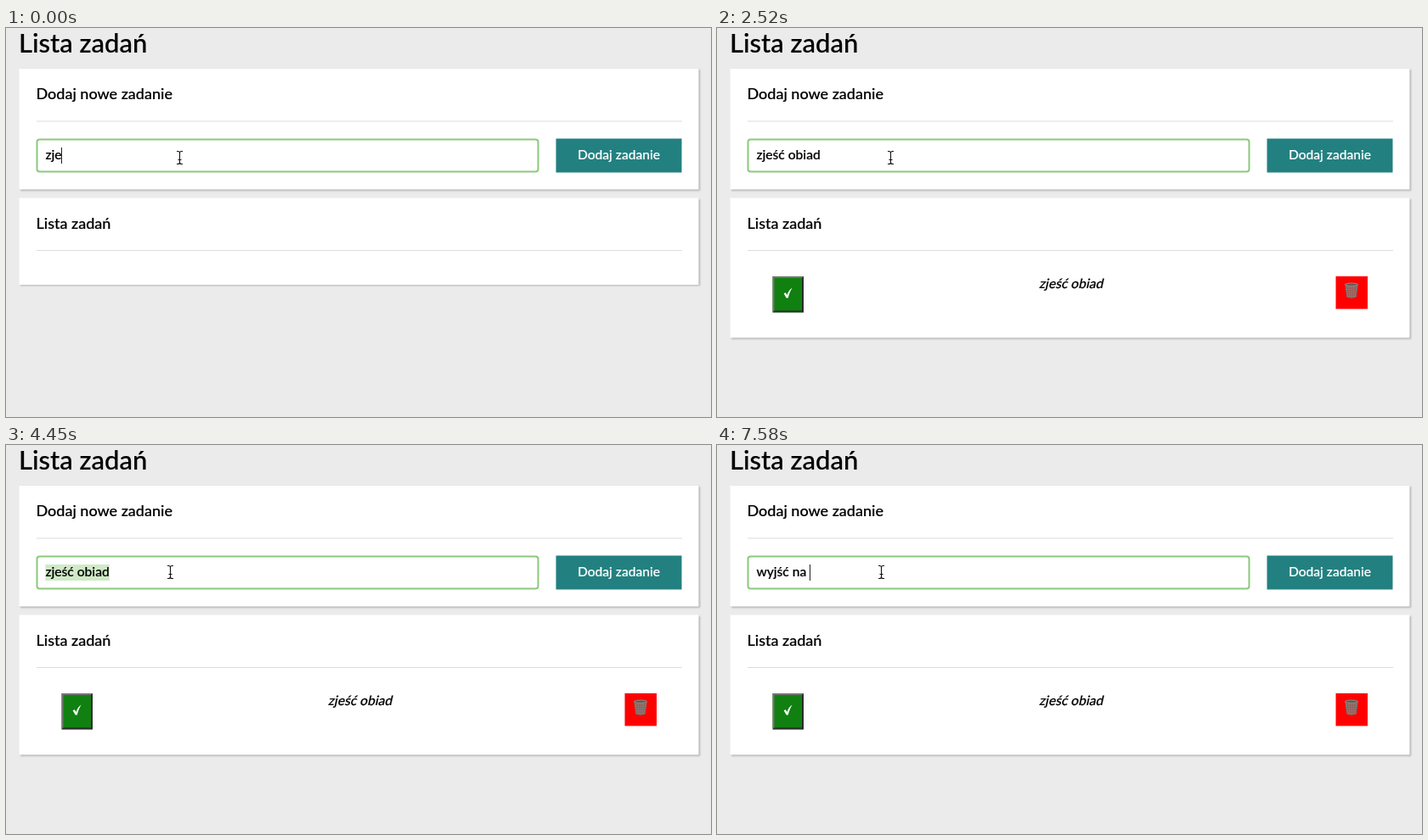
Animation of 830x459 px, one loop 8 s. Source, as an HTML page with a canvas:

```html
<!DOCTYPE html>
<html lang="pl">
<head>
<meta charset="utf-8">
<title>Lista zadań</title>
<style>
html, body { margin: 0; width: 830px; height: 459px; overflow: hidden; background: #ebebeb; }
canvas { display: block; }
</style>
</head>
<body>
<canvas id="stage" width="830" height="459"></canvas>
<script>
const ctx = document.getElementById('stage').getContext('2d');
const LOOP = 8000;
const TASK = 'zjeść obiad';
const INPUT_X = 46.4;

// Each entry holds from its time until the next one.
const typing = [
  [0, 'zje'], [290, 'zjeś'], [590, 'zjeść'], [890, 'zjeść '], [1030, 'zjeść o'],
  [1330, 'zjeść ob'], [1620, 'zjeść obi'], [1770, 'zjeść obia'], [2070, TASK],
  [5790, 'w'], [5940, 'wy'], [6240, 'wyj'], [6530, 'wyjś'], [6830, 'wyjść'],
  [7130, 'wyjść n'], [7280, 'wyjść na'], [7580, 'wyjść na ']
];
const caret = [[0, true], [2520, false], [3120, true], [3560, false], [4000, true], [4300, false], [5790, true]];
const selection = [[0, null], [4300, 6], [4450, 0], [5790, null]];
const pointer = [[0, [204.5, 153]], [3560, [203.5, 147]], [3710, [199.5, 148]], [3860, [193.5, 150]]];

const at = (steps, t) => steps.findLast(([start]) => t >= start)[1];
const setFont = size => { ctx.font = `500 ${size}px Lato, sans-serif`; };

function box(x, y, w, h, color) {
  ctx.fillStyle = color;
  ctx.fillRect(x, y, w, h);
}

function text(str, x, y, size, color = '#000', align = 'left') {
  setFont(size);
  ctx.textAlign = align;
  ctx.fillStyle = ctx.strokeStyle = color;
  ctx.lineWidth = 0.2;
  ctx.fillText(str, x, y);
  ctx.strokeText(str, x, y);
}

function widthOf(str) {
  setFont(15.6);
  return ctx.measureText(str).width;
}

function stroke(path, color, width) {
  ctx.strokeStyle = color;
  ctx.lineWidth = width;
  ctx.stroke(new Path2D(path));
}

function fill(path, color) {
  ctx.fillStyle = color;
  ctx.fill(new Path2D(path));
}

function card(y, h, heading) {
  ctx.save();
  ctx.shadowColor = 'rgba(0,0,0,.25)';
  ctx.shadowBlur = 2;
  ctx.shadowOffsetX = ctx.shadowOffsetY = 1;
  box(15.5, y, 800, h, '#fff');
  ctx.restore();
  text(heading, 35.5, y + 36, 18);
  box(36, y + 61.5, 760, 1, '#dcdcdc');
}

function doneButton() {
  box(65.5, 293, 36.5, 42.5, '#108010');
  fill('M65.5 335.5V293H102L100 295H67.5V333.5Z', '#757575');
  fill('M102 293V335.5H65.5L67.5 333.5H100V295Z', '#2b2b2b');
  fill('M78.6 313.2L80.8 312.2L82.6 315C83.6 311.8 85.4 308.8 88.6 306.6C86.4 310.4 84.8 314.2 83.8 318.6H81.6Z', '#fff');
}

function deleteButton() {
  box(728.5, 293, 37.5, 38.5, '#f00');
  fill('M739.8 303L741.8 317.3Q747 319.4 752.2 317.3L754.2 303Z', '#a5504c');
  for (let i = 0; i < 5; i++) {
    const x = 741 + i * 3;
    stroke(`M${x} 304L${747 + (x - 747) * 0.72} 318`, '#7d817b', 0.8);
    stroke(`M${740.2 + i * 0.4} ${306 + i * 2.6}H${753.8 - i * 0.4}`, '#858a84', 0.7);
  }
  stroke('M739.8 303L741.8 317.3Q747 319.4 752.2 317.3L754.2 303', '#77736f', 1);
  ctx.beginPath();
  ctx.ellipse(747, 302.7, 7.6, 1.6, 0, 0, Math.PI * 2);
  ctx.fillStyle = '#5c5552';
  ctx.fill();
  ctx.strokeStyle = '#8d918c';
  ctx.lineWidth = 1;
  ctx.stroke();
}

function taskRow() {
  doneButton();
  ctx.save();
  ctx.transform(1, 0, -0.22, 1, 379, 306.5);
  text(TASK, 0, 0, 15.6);
  ctx.restore();
  deleteButton();
}

function inputField(t) {
  ctx.beginPath();
  ctx.roundRect(36.5, 131.5, 590, 38, 3);
  ctx.strokeStyle = '#8bc97b';
  ctx.lineWidth = 2;
  ctx.stroke();

  const value = at(typing, t);
  const end = INPUT_X + widthOf(value);
  const from = at(selection, t);
  if (from !== null) {
    const start = INPUT_X + widthOf(value.slice(0, from));
    box(start, 141, end - start, 19, '#cfeac7');
  }
  text(value, INPUT_X, 155, 15.6);
  if (at(caret, t)) box(Math.round(end - 0.6), 141, 1, 19, '#222');
}

function iBeam([x, y]) {
  ctx.save();
  ctx.translate(x, y);
  const shape = 'M-3.5 -7.5H-2Q0 -7.5 0 -5.5Q0 -7.5 2 -7.5H3.5M0 -5.5V5.5M-3.5 7.5H-2Q0 7.5 0 5.5Q0 7.5 2 7.5H3.5M-2 2.5H2';
  stroke(shape, '#fff', 2.5);
  stroke(shape, '#111', 1.1);
  ctx.restore();
}

function draw(now) {
  const t = now % LOOP;
  const added = t >= 2520;
  box(0, 0, 830, 459, '#ebebeb');
  text('Lista zadań', 15, 29, 31);
  card(48, 142.5, 'Dodaj nowe zadanie');
  inputField(t);
  box(647.5, 130.5, 148, 40, '#238080');
  text('Dodaj zadanie', 721.5, 155, 15.6, '#fff', 'center');
  card(200.5, added ? 165 : 102.5, 'Lista zadań');
  if (added) taskRow();
  iBeam(at(pointer, t));
  requestAnimationFrame(draw);
}
requestAnimationFrame(draw);
</script>
</body>
</html>
```
